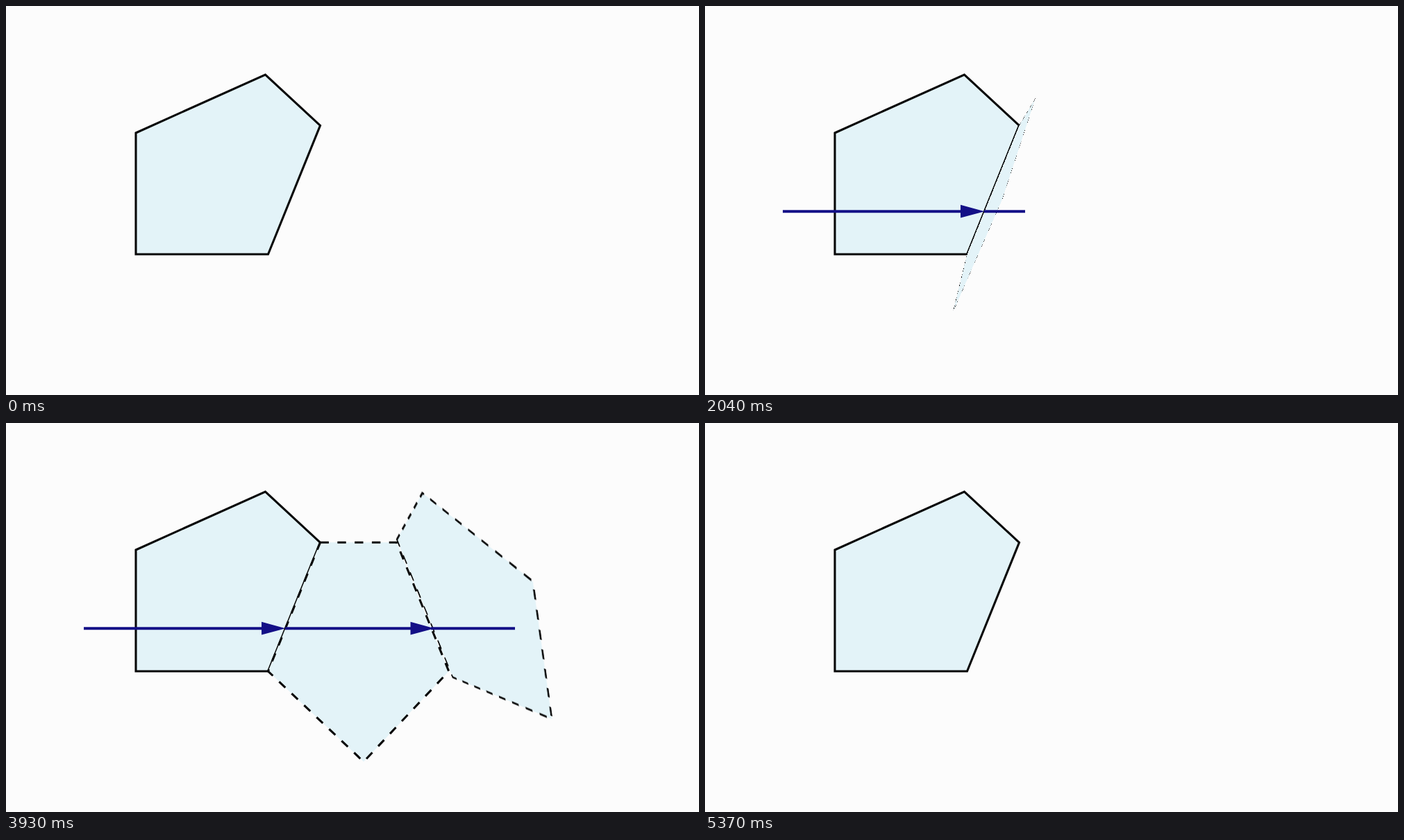
These frames come from a looping animation (998x561 px, 5400 ms). An HTML page:

```html
<!DOCTYPE html>
<html lang="en">
<head>
<meta charset="utf-8">
<title>Unfolding a polygon along a straight path</title>
<style>
  html, body { margin: 0; width: 100%; height: 100%; overflow: hidden; background: #fcfcfc; }
  #stage { position: relative; width: 998px; height: 561px; overflow: hidden; }
  #unfolded { position: absolute; inset: 0; }
  svg { position: absolute; left: 0; top: 0; width: 998px; height: 561px; transform-origin: 0 0; }
  polygon { fill: #e3f3f8; stroke: #080808; stroke-width: 3.1; stroke-miterlimit: 10; }
  .dashed { stroke-dasharray: 12.4; }
  .arrow { fill: #130f87; }
</style>
</head>
<body>
<div id="stage"><div id="unfolded"></div></div>
<script>
const LOOP = 5400, STEP = 30, GROW = 900, FOLD = 540;
const FADE_START = 4950, FADE_TIME = 420;
const WIDTH = 998, AXIS_Y = 296.2;

const stage = document.getElementById('stage');
const unfolded = document.getElementById('unfolded');

const C = [452.5, 172.3], D = [377.5, 358], F = [562.5, 172.3], G = [637.7, 358];
const base = [[187, 183], [373.5, 99], C, D, [187, 358]];

// Each fold turns about the edge between its first and last point.
const folds = [
  { start: 1800, points: [C, F, G, [515, 488.5], D],
    eye: [410, 198], depth: 2860, lift: 0, ease: 1.24 },
  { start: 3600, points: [F, [642, 99], [828.3, 183], [828.3, 358], G],
    eye: [557, 234], depth: 1330, lift: 93, ease: 1.15 }
];

const arrows = [
  { start: 0, from: 112, tip: 402.5, reach: 406 },
  { start: 1800, from: 402, tip: 617, reach: 620.5 },
  { start: 3600, from: 612, tip: 941, reach: 942 }
];

function addLayer(parent, content) {
  parent.insertAdjacentHTML('beforeend', `<svg viewBox="0 0 998 561">${content}</svg>`);
  return parent.lastElementChild;
}

function addPolygon(parent, points, className = '') {
  return addLayer(parent, `<polygon class="${className}" points="${points.join(' ')}"/>`);
}

function addArrow({ from, tip }) {
  const neck = tip - 34.5;
  return addLayer(unfolded, `<path class="arrow" d="M${from} ${AXIS_Y - 2}H${neck}v-7.4
    L${tip} ${AXIS_Y}L${neck} ${AXIS_Y + 9.4}v-7.4H${from}z"/>`);
}

function drawFold(fold, time) {
  const elapsed = time - fold.start;
  fold.layer.style.visibility = elapsed >= 0 ? 'visible' : 'hidden';
  if (elapsed < 0 || elapsed >= FOLD) {
    fold.layer.style.transform = 'none';
    return;
  }
  const angle = Math.PI * (1 - elapsed / FOLD) ** fold.ease;
  const [hx, hy] = fold.points[0];
  const [ex, ey] = fold.points[4];
  const [cx, cy] = fold.eye;
  const z = fold.lift * Math.sqrt(Math.max(0, Math.sin(angle)));
  fold.layer.style.transform =
    `translate(${cx}px, ${cy}px) perspective(${fold.depth}px) ` +
    `translate3d(${-cx}px, ${-cy}px, ${z.toFixed(3)}px) translate(${hx}px, ${hy}px) ` +
    `rotate3d(${ex - hx}, ${ey - hy}, 0, ${(-angle).toFixed(5)}rad) ` +
    `translate(${-hx}px, ${-hy}px)`;
}

function drawArrow(arrow, time) {
  const progress = Math.min(1, (time - arrow.start) / GROW);
  const edge = arrow.from + (arrow.reach - arrow.from) * progress;
  arrow.layer.style.visibility = progress > 0 ? 'visible' : 'hidden';
  arrow.layer.style.clipPath = `inset(0 ${WIDTH - edge}px 0 0)`;
}

function draw(time) {
  folds.forEach(fold => drawFold(fold, time));
  arrows.forEach(arrow => drawArrow(arrow, time));
  const fade = (time - FADE_START) / FADE_TIME;
  unfolded.style.opacity = Math.min(1, Math.max(0, 1 - fade));
}

stage.prepend(addPolygon(stage, base));
arrows.forEach((arrow, i) => {
  if (i) folds[i - 1].layer = addPolygon(unfolded, folds[i - 1].points, 'dashed');
  arrow.layer = addArrow(arrow);
});

const origin = performance.now();
function tick() {
  const time = (performance.now() - origin) % LOOP;
  draw(Math.floor(time / STEP) * STEP);
  requestAnimationFrame(tick);
}
tick();
</script>
</body>
</html>
```
